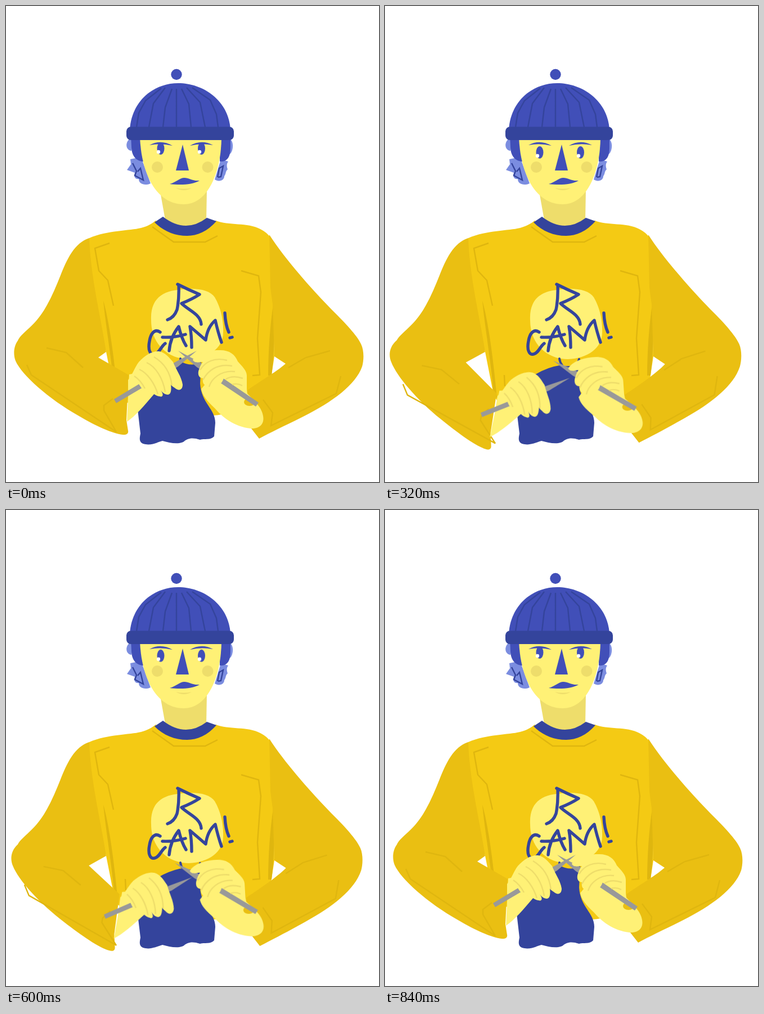
These frames come from a looping animation (663 by 845 pixels, 0.88 s). An HTML page without scripts:

```html
<!DOCTYPE html>
<html lang="en">
<head>
<meta charset="utf-8">
<title>Knitter</title>
<style>
  html, body { margin: 0; width: 100%; height: 100%; overflow: hidden; background: #fff; }
  svg { display: block; width: 100%; height: 100%; }

  .skin { fill: #fff176; }
  .shade { fill: #eedd6b; }
  .navy { fill: #34449c; }
  .blue { fill: #414fb8; }
  .hair { fill: #7b8de0; }
  .body { fill: #f4ca14; }
  .sleeve { fill: #eabf12; }
  .fold { fill: #dfb60f; }
  .needle { fill: #999; }
  .line { fill: none; stroke-width: 2.4; }
  .seam { stroke: #dfb60f; }
  .crease { stroke: #eedd6b; }
  .ink { stroke: #34449c; }
  .letters { stroke-width: 5.4; stroke-linecap: round; stroke-linejoin: round; }

  /* Out in 11 steps, back in 10, then one step of rest */
  .bend, .swing, .look { animation: 880ms steps(11) infinite; }
  .bend { d: var(--rest); animation-name: bend; }
  .swing { animation-name: swing; }
  .look { animation-name: look; }
  @keyframes bend {
    0%, 95.454545%, 100% { d: var(--rest); }
    50% { d: var(--reach); animation-timing-function: steps(10); }
  }
  @keyframes swing {
    0%, 95.454545%, 100% { transform: rotate(0deg); }
    50% { transform: rotate(var(--turn)); animation-timing-function: steps(10); }
  }
  @keyframes look {
    0%, 95.454545%, 100% { transform: translateY(0); }
    50% { transform: translateY(9.5px); animation-timing-function: steps(10); }
  }

  #left-hand { --turn: 12.4deg; transform-origin: 28px 569.5px; }
  #right-hand { --turn: -5.4deg; transform-origin: 555px 728px; }

  #left-arm {
    --rest: path("M148 412C122 420 108 450 97 478C84 510 70 544 46 567C36 577 24 586 21 594C13 605 13 620 17 630C28 655 75 697 130 728C160 746 190 759 207 761C215 762 218 758 217 754L214 735L218 655L164 624L178 614C170 560 150 480 148 412Z");
    --reach: path("M148 412C122 420 108 450 97 478C84 510 70 544 46 567C36 577 24 587 21 593C4 606 4 622 9 633C18 658 50 700 87 735C115 760 150 790 168 796C174 799 178 797 178 791L178 765L191 700L136 636L178 614C170 560 150 480 148 412Z");
  }
  #left-elbow {
    --rest: path("M72 607L107 615L137 642");
    --reach: path("M63 650L98 657L130 682");
  }
  #left-cuff {
    --rest: path("M37 637L45 655L196 756L174 718L174 709L190 697");
    --reach: path("M30 684L38 704L196 784L168 742L170 735L182 722");
  }
  #right-arm {
    --rest: path("M468 406C495 448 545 505 585 545C608 568 626 588 631 600C637 612 636 630 633 640C622 672 580 703 530 728C500 743 470 757 450 768L432 745L428 683C445 670 480 650 497 635L477 622L474 530L470 500Z");
    --reach: path("M468 406C495 448 545 505 585 545C608 568 624 588 629 600C634 612 633 630 630 640C619 675 580 706 535 732C505 750 478 765 452 778L434 755L425 693C445 680 480 656 498 636L477 622L474 530L470 500Z");
  }
  #right-elbow {
    --rest: path("M502 642L533 624L576 612");
    --reach: path("M494 648L525 627L567 613");
  }
  #right-cuff {
    --rest: path("M595 657L587 688L471 745L474 722L457 699");
    --reach: path("M589 657L585 691L472 755L472 734L456 710");
  }
  #knitting {
    --rest: path("M234 716L262 688L272 650Q292 640 308 630Q330 642 347 632L345 670C347 705 372 715 372 740L370 764C362 772 352 767 345 770C330 765 322 768 315 774C304 779 290 775 278 772C268 775 258 780 248 778C236 776 237 769 239 759Z");
    --reach: path("M236 735L262 690L266 655Q290 641 311 641Q330 642 345 634L345 670C347 705 372 715 372 740L370 764C362 772 352 767 345 770C330 765 322 768 315 774C304 779 290 775 278 772C268 775 258 780 248 778C236 776 237 769 239 759Z");
  }
</style>
</head>
<body>
<svg viewBox="0 0 663 845">
  <!-- Head -->
  <g class="hair">
    <path d="M225 234C212 236 210 256 223 257Z"/>
    <path d="M221 272L222 281L215 291L229 296C226 304 231 308 236 307C236 317 248 319 257 315L240 268Z"/>
    <path d="M396 235C406 238 405 260 396 264Z"/>
    <path d="M382 272L395 276C391 281 393 287 394 290C390 293 391 299 388 302C388 310 378 313 371 308Z"/>
  </g>
  <path class="shade" d="M275 335L284 385Q320 400 356 382L357 325Z"/>
  <path class="blue" d="M222 230H245V276C230 276 223 264 223 250ZM380 230H399V250C399 266 395 277 380 276Z"/>
  <path class="skin" d="M238 232C240 292 264 352 316 352C360 352 383 292 383 232Z"/>
  <path class="line ink" d="M225 279L232 293L229 301L244 309L239 288L234 294M376 304L379 288L386 284L382 303L377 304"/>
  <circle class="blue" cx="303" cy="121.5" r="9.7"/>
  <path class="blue" d="M220 220C223 169 262 137 306 137C351 137 396 168 399 220Z"/>
  <path class="line ink" d="M276 146L248 168L236 190L232 215M283 145L262 173L254 215M295 147L283 180L279 215M303 147V215M312 147L325 174L329 215M321 145L345 171L354 215M331 145L363 167L374 192L377 215"/>
  <rect class="navy" x="214" y="214.5" width="191" height="23.5" rx="8"/>

  <g class="blue">
    <path d="M255 247Q275 236 296 248Q275 243 255 247Z"/>
    <path d="M327 248Q347 236 368 247Q347 243 327 248Z"/>
    <path d="M314 246L302 292H325Z"/>
    <path d="M291 316C302 313 309 305 317 305C325 305 331 311 344 310C331 318 308 318 291 316Z"/>
  </g>
  <g class="look">
    <ellipse class="blue" cx="275" cy="253" rx="6.5" ry="11"/>
    <ellipse class="blue" cx="347.5" cy="253" rx="6.5" ry="11"/>
    <circle cx="271" cy="259" r="3.2" fill="#fff"/>
    <circle cx="344" cy="259" r="3.2" fill="#fff"/>
  </g>
  <g class="shade">
    <circle cx="269" cy="286" r="10"/>
    <circle cx="358.5" cy="286" r="10"/>
    <path d="M302 323Q316 326 330 323Q316 331 302 323Z"/>
  </g>

  <!-- Sweater -->
  <path class="body" d="M148 412C180 398 220 399 240 394C252 391 260 386 266 381Q320 420 373 381C395 390 430 384 452 396Q464 402 470 411L476 530L477 622L472 655L470 672L440 698L383 725Q372 728 360 726L200 702L193 690L178 614C164 560 142 480 146 414Z"/>
  <path class="navy" d="M264 384L279 374Q319 405 357 376L374 382C358 400 340 408 322 408C300 408 280 400 264 384Z"/>
  <path class="fold" d="M173 523C182 555 191 610 199 696L193 690C190 640 178 575 173 523Z"/>
  <path class="line seam" d="M184 421L158 430L165 470L181 487L191 532M260 392L298 419H354L376 408M418 470L449 479L453 508L447 590L451 655L438 656M212 655L213 675"/>
  <path id="left-arm" class="sleeve bend"/>
  <path class="fold" d="M476 523C478 560 478 605 472 656H466C466 610 470 560 476 523Z"/>
  <path id="right-arm" class="sleeve bend"/>
  <g class="line seam">
    <path id="left-elbow" class="bend"/>
    <path id="left-cuff" class="bend"/>
    <path id="right-elbow" class="bend"/>
    <path id="right-cuff" class="bend"/>
  </g>

  <!-- Lettering -->
  <path class="skin" d="M258 558C256 520 278 507 305 504C335 499 362 503 371 517C380 532 387 555 386 580C386 607 360 626 325 627C290 627 258 602 258 558Z"/>
  <g class="line ink letters">
    <path d="M307 495Q308 520 304 539Q299 553 287 557M305 494Q325 504 344 512Q330 521 312 528C324 540 346 547 347 565"/>
    <path d="M274 579C264 572 257 582 255 595C252 610 256 620 264 618C273 616 275 605 283 599"/>
    <path d="M290 612Q292 588 307 569Q312 590 320 603M278 588Q298 589 319 583"/>
    <path d="M330 606Q330 585 327 569Q340 580 355 593Q358 570 372 558Q377 580 383 597"/>
    <path d="M389 545Q390 566 396 579M398 589L402 588"/>
  </g>

  <!-- Knitting and hands -->
  <path id="knitting" class="navy bend"/>
  <path class="line ink" stroke-linecap="round" style="stroke-width:4" d="M310 626Q311 633 315 638M345 627L343 633"/>

  <g id="right-hand" class="swing">
    <path class="skin" d="M347 680L372 650L424 650L429 688C440 700 455 712 457 728C460 744 448 751 435 750C405 747 384 729 371 714C357 701 349 691 347 680Z"/>
    <ellipse class="sleeve" cx="433" cy="703" rx="10" ry="7"/>
    <path class="needle" d="M449 704L344 632L306 612L339 641L444 711Z"/>
    <path class="skin" d="M332 628C340 616 360 611 378 611C396 610 407 618 412 631C419 639 428 647 428 656V689L387 661C382 676 367 680 360 675C350 674 349 667 350 661C341 660 340 651 344 643C345 639 347 636 350 632C344 632 335 635 332 628Z"/>
    <path class="line crease" d="M345 646C354 632 370 623 393 629M350 664C358 648 375 634 402 639M361 676C365 662 382 646 407 649M390 663C396 659 406 656 421 661M402 672Q411 669 420 674"/>
  </g>

  <g id="left-hand" class="swing">
    <path class="skin" d="M219 654L215 738C230 728 246 709 264 688L240 650Z"/>
    <path class="needle" d="M192 698L301 632L339 612L306 640L196 705Z"/>
    <path class="skin" d="M217 664C225 654 228 643 236 632C247 620 260 612 272 613C283 615 290 624 297 632C302 645 312 658 314 672C314 682 307 684 300 678C296 676 294 673 293 672C294 680 294 689 288 690C282 690 278 686 275 682C281 690 279 695 273 693C265 692 260 686 257 684C250 687 243 681 240 677L236 671L217 682Z"/>
    <path class="line crease" d="M263 623C280 633 292 648 295 674M250 633C266 640 279 661 283 685M237 645C252 652 264 670 270 689M228 657Q239 664 247 679"/>
  </g>
</svg>
</body>
</html>
```
